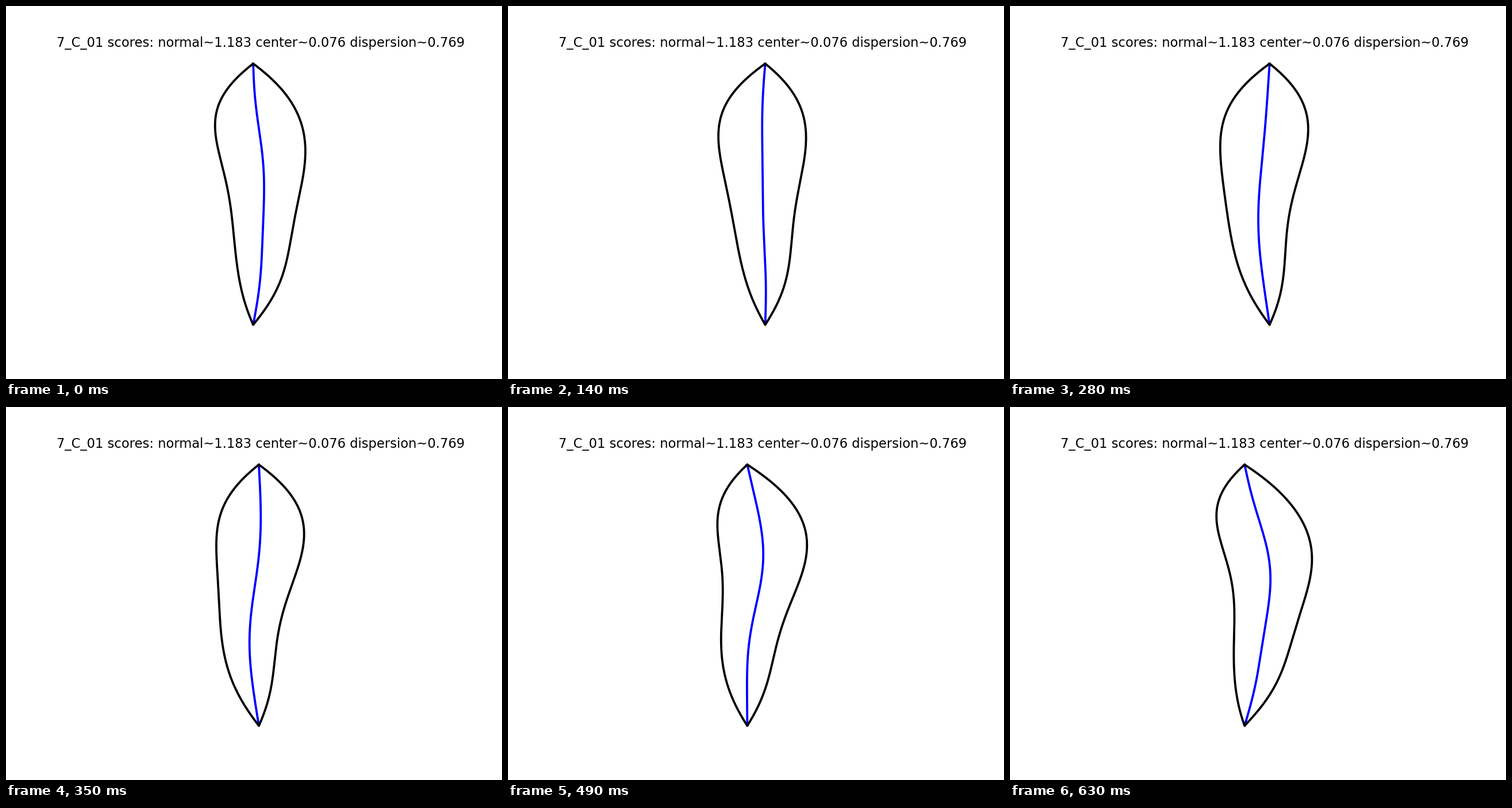
Write a matplotlib script that moves like this. It is 863x649 px and loops after 700 ms.

```python
import numpy as np
import matplotlib.pyplot as plt
from matplotlib.animation import FuncAnimation

W, H, DPI = 863, 649, 128
PX = 72 / DPI
TOP, BOTTOM, CENTER = 100.3, 554.7, 442.3

# Key amplitudes over one cycle: the C-shaped sway and the S-shaped twist
SWAY = [18.2, 6, -4.1, -17, -17.5, -9, 3.5, 18.4, 33.2, 41.9]
TWIST = [-2.3, -3, -2.5, -1.1, 3.8, 9.1, 11.7, 12, 8.4, 2]

u = np.linspace(0, 1, 300)
y = TOP + u * (BOTTOM - TOP)

# Half width: a parabola shaped by a quartic through five evenly spaced points
fullness = np.polyfit(np.linspace(0, 1, 5), [600, 404, 244, 230, 278], 4)
body = u * (1 - u) * np.polyval(fullness, u)


def midline(sway, twist):
    """Sum of standing waves that vanish at both tips."""
    modes = [sway, twist, -0.04 * sway, -1 - 0.035 * sway]
    return sum(a * np.sin(n * np.pi * u) for n, a in enumerate(modes, 1))


fig = plt.figure(figsize=(W / DPI, H / DPI), dpi=DPI, facecolor="white")
ax = fig.add_axes([0, 0, 1, 1])
ax.set(xlim=(0, W), ylim=(H, 0))
ax.axis("off")

ax.text(443, 71.5, "7_C_01 scores: normal~1.183 center~0.076 dispersion~0.769",
        family="DejaVu Sans", size=22.6 * PX, ha="center", va="baseline")
style = dict(lw=3.8 * PX, solid_joinstyle="round", solid_capstyle="round")
spine, = ax.plot([], [], color="blue", **style)
outline, = ax.plot([], [], color="black", **style)


def draw(k):
    sway = SWAY[k]
    mid = midline(sway, TWIST[k])
    half = body * (1 + 0.0015 * sway * u)  # the tail swells with the sway
    left, right = mid - half, mid + half
    shift = CENTER - (left.min() + right.max()) / 2
    spine.set_data(mid + shift, y)
    outline.set_data(np.r_[left, right[::-1], left[:2]] + shift,
                     np.r_[y, y[::-1], y[:2]])
    return spine, outline


anim = FuncAnimation(fig, draw, frames=len(SWAY), interval=70, repeat=True)
plt.show()
```
